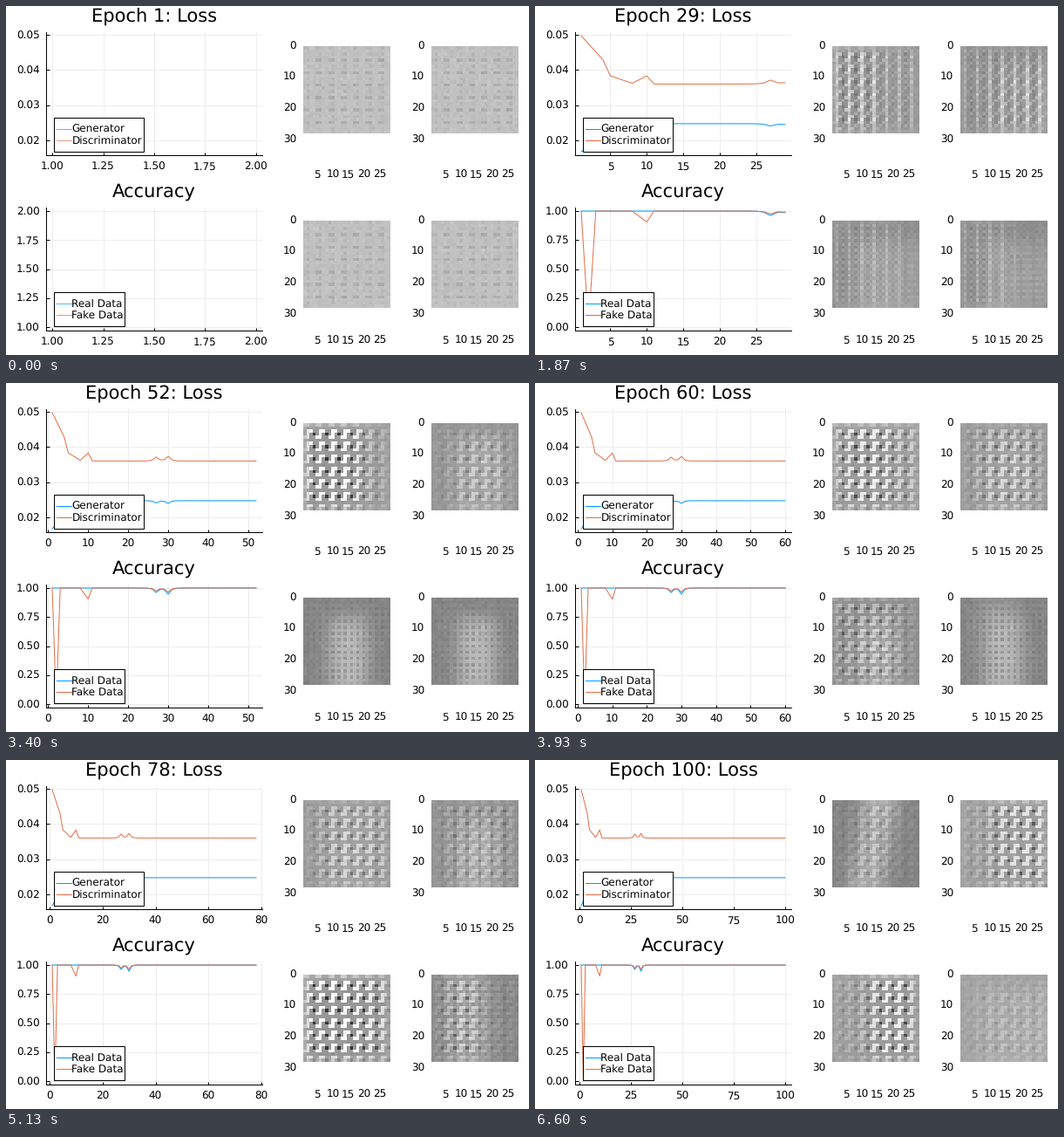
Animation of 600 by 400 pixels, one loop 6670 ms. Source, as a matplotlib script:

```python
import matplotlib.pyplot as plt
import numpy as np
from matplotlib.animation import FuncAnimation
from matplotlib.patches import Rectangle

W, H, DPI = 600, 400, 100
PX = 72 / DPI
EPOCHS, LOOP_MS = 100, 6670
STEPS = 2 * EPOCHS
BLUE, ORANGE = "#009AFA", "#E36F47"

plt.rcParams.update({
    "font.family": "DejaVu Sans",
    "font.size": 12 * PX,
    "text.hinting": "none",
    "axes.linewidth": PX,
})


# ---- training curves -------------------------------------------------

epochs = np.arange(1, EPOCHS + 1)


def spikes(first, second):
    """Two short disturbances, at epochs 27 and 30."""
    return sum(h * np.exp(-1.5 * abs(epochs - c))
               for c, h in ((27, first), (30, second)))


disc = np.interp(epochs, [1, 4, 5, 8, 10, 11],
                 [.0497, .0428, .0383, .0362, .0383, .036]) + spikes(.0011, .0013)
gen = .02475 - .58 * (disc - .036)
fake = np.interp(epochs, [1, 2, 3, 8, 10, 11],
                 [1, 0, 1, 1, .905, 1]) - spikes(.024, .034)
real = 1 - spikes(.038, .053)


def limits(lo, hi):
    if hi - lo < 1e-9:
        hi = lo + 1
    pad = .03 * (hi - lo)
    return lo - pad, hi + pad


def nice_ticks(lo, hi):
    """Score round steps by count, coverage and niceness; return ticks, labels."""
    span = hi - lo
    best, pick = (-1, 0), None
    for z in range(-4, 3):
        for q, nice in ((1, 1), (5, .9), (2, .7), (2.5, .5), (3, .2)):
            step = q * 10.0 ** z
            first, last = np.ceil(lo / step), np.floor(hi / step)
            n = int(last - first) + 1
            if not 4 <= n <= 8:
                continue
            score = ((1 - abs(n - 5) / 5) / 4 + (first <= 0 <= last) / 6
                     + .5 * span / ((n - 1) * step) + nice / 4)
            key = (round(score, 9), -n)
            if key > best:
                places = max(0, -z + (q == 2.5))
                best, pick = key, (np.arange(first, last + 1) * step, places)
    ticks, places = pick
    return ticks, [f"{t + 0:.{places}f}" for t in ticks]


# ---- generated images ------------------------------------------------

Y, X = np.mgrid[0:28, 0:28]
BORDER = np.minimum(np.minimum(X, 27 - X), np.minimum(Y, 27 - Y))
FADE = np.clip((BORDER + 1) / 3, 0, 1)
QUARTER = np.pi / 2

TOOTH = (np.cos(QUARTER * (X - 1)) + np.cos(QUARTER * (X + Y))
         + .5 * np.cos(np.pi * Y)) / 1.5
DOTS = np.cos(QUARTER * (X - 1)) * .5 + 1.2 * (X % 2) * (Y % 2) - .4
ROWS = .7 * np.cos(np.pi * Y) + .35 * np.cos(np.pi * X)
COLS = np.cos(np.pi * X)
GRID = .4 - 1.6 * (X % 2) * (Y % 2)
SEED = -1. * (Y % 4 == 0) * (X % 4 < 2) - .5 * (Y % 4 == 2) * (X % 4 == 1)


def step(v, soft=1.6):
    return 1 / (1 + np.exp(-v / soft))


def look(texture, left=-20, right=48, top=-20, wall=.05, base=.69, lean=0):
    """Texture inside a soft window with darker walls around it."""
    x = X + lean * (Y - 14)
    inside = step(x - left) * step(right - x) * step(Y - top)
    return base - wall * (1 - inside) + FADE * (.25 + .75 * inside) * texture


def arch(texture, left=8, right=20, top=6, lean=0):
    return look(texture, left, right, top, wall=.18, base=.7, lean=lean)


SHOWN = {
    1: [look(.08 * SEED, base=.755)] * 4,
    18: [look(.18 * DOTS, right=r, wall=.1, base=.65) for r in (27, 30, 22, 16)],
    40: [look(.28 * TOOTH, right=14), look(.2 * TOOTH, 9, top=5, wall=.12)]
        + [look(.07 * ROWS, 7, top=6, wall=.14)] * 2,
    52: [look(.28 * TOOTH, right=19), look(.12 * TOOTH, 7, 23, 4, .1)]
        + [arch(.08 * GRID)] * 2,
    69: [look(.2 * TOOTH, 4), look(.2 * TOOTH, 4, 26),
         look(.28 * TOOTH, right=21), arch(.1 * GRID, 6, 18, 0)],
    86: [look(.1 * TOOTH, 6, 24, 2, .1), arch(.05 * COLS),
         look(.3 * TOOTH), look(.27 * TOOTH, 3, 15, wall=.13)],
    100: [arch(.1 * TOOTH, 7, 18, -20, lean=.16), look(.2 * TOOTH, 9),
          look(.25 * TOOTH, 11, 26), look(.06 * TOOTH, 5, top=4)],
}
STOPS = list(SHOWN)
noise = np.random.default_rng(4).normal(0, .012, (4, 28, 28))


def images(epoch):
    i = min(np.searchsorted(STOPS, epoch, side="right") - 1, len(STOPS) - 2)
    a, b = STOPS[i], STOPS[i + 1]
    t = (epoch - a) / (b - a)
    mix = (1 - t) * np.array(SHOWN[a]) + t * np.array(SHOWN[b])
    return np.clip(mix + noise, 0, 1)


# ---- stage -----------------------------------------------------------

fig = plt.figure(figsize=(W / DPI, H / DPI), dpi=DPI, facecolor="white")


def overlay(z):
    ax = fig.add_axes([0, 0, 1, 1], zorder=z)
    ax.set(xlim=(0, W), ylim=(H, 0))
    ax.axis("off")
    return ax


def label(ax, x, y, s, size=12, ha="center"):
    baseline = round(y + .365 * size)
    return ax.text(x, baseline, s, size=size * PX, ha=ha, va="baseline")


def plot_axes(top):
    ax = fig.add_axes([46 / W, (H - top - 141) / H, 248 / W, 141 / H], zorder=1)
    ax.spines[["top", "right"]].set_visible(False)
    ax.set_axisbelow(True)
    ax.grid(color="#ededed", lw=PX)
    ax.tick_params(direction="in", length=3.5 * PX, width=PX)
    ax.tick_params(axis="x", pad=7.3 * PX)
    ax.tick_params(axis="y", pad=7.5 * PX)
    return ax, [ax.plot([], [], color=c, lw=PX)[0] for c in (BLUE, ORANGE)]


def legend(ax, top, width, names):
    ax.add_patch(Rectangle((55, top), width, 39, fc="white", ec="black", lw=PX))
    keys = []
    for i, (name, color) in enumerate(zip(names, (BLUE, ORANGE))):
        y = top + 13 + 13 * i
        keys += ax.plot([58, 75], [y, y], color=color, lw=PX)
        label(ax, 75.4, y, name, ha="left")
    return keys


back, front = overlay(0), overlay(2)
loss_ax, loss_lines = plot_axes(30)
acc_ax, acc_lines = plot_axes(231)

title = label(front, 170, 11, "", 21)
label(front, 170, 211, "Accuracy", 21)
legend_keys = (legend(front, 128, 103, ("Generator", "Discriminator"))
               + legend(front, 328, 81, ("Real Data", "Fake Data")))

CELL = 100 / 28
maps = []
for top, foot in ((46, 192.5), (246, 383)):
    for left in (341, 488):
        maps.append(back.imshow(np.zeros((28, 28)), cmap="gray", vmin=0, vmax=1,
                                extent=(left, left + 100, top + 100, top),
                                interpolation="nearest", aspect="auto"))
        for v in range(5, 26, 5):
            label(back, left + (v - .5) * CELL, foot, str(v))
        for v in range(0, 31, 10):
            label(back, left - 8, top + (v - .5) * CELL + 1, str(v), ha="right")
back.set(xlim=(0, W), ylim=(H, 0))


def show(ax, lines, series, n):
    for line, v in zip(lines, series):
        line.set_data(epochs[:n], v[:n])
    seen = np.concatenate([v[:n] for v in series])
    xlim, ylim = limits(1, n), limits(seen.min(), seen.max())
    ax.set(xlim=xlim, ylim=ylim)
    ax.set_xticks(*nice_ticks(*xlim))
    ax.set_yticks(*nice_ticks(*ylim))


def update(frame):
    # half a step ahead, so each epoch is up by its nominal time
    n = min((frame + 1) // 2 + 1, EPOCHS)
    title.set_text(f"Epoch {n}: Loss")
    show(loss_ax, loss_lines, (gen, disc), n)
    show(acc_ax, acc_lines, (real, fake), n)
    for key in legend_keys:
        key.set_alpha(.7 if n == 1 else 1)
    for im, data in zip(maps, images(n)):
        im.set_data(data)
    return []


anim = FuncAnimation(fig, update, frames=STEPS, init_func=lambda: update(0),
                     interval=LOOP_MS / STEPS, repeat=True, repeat_delay=0,
                     blit=False)
plt.show()
```
